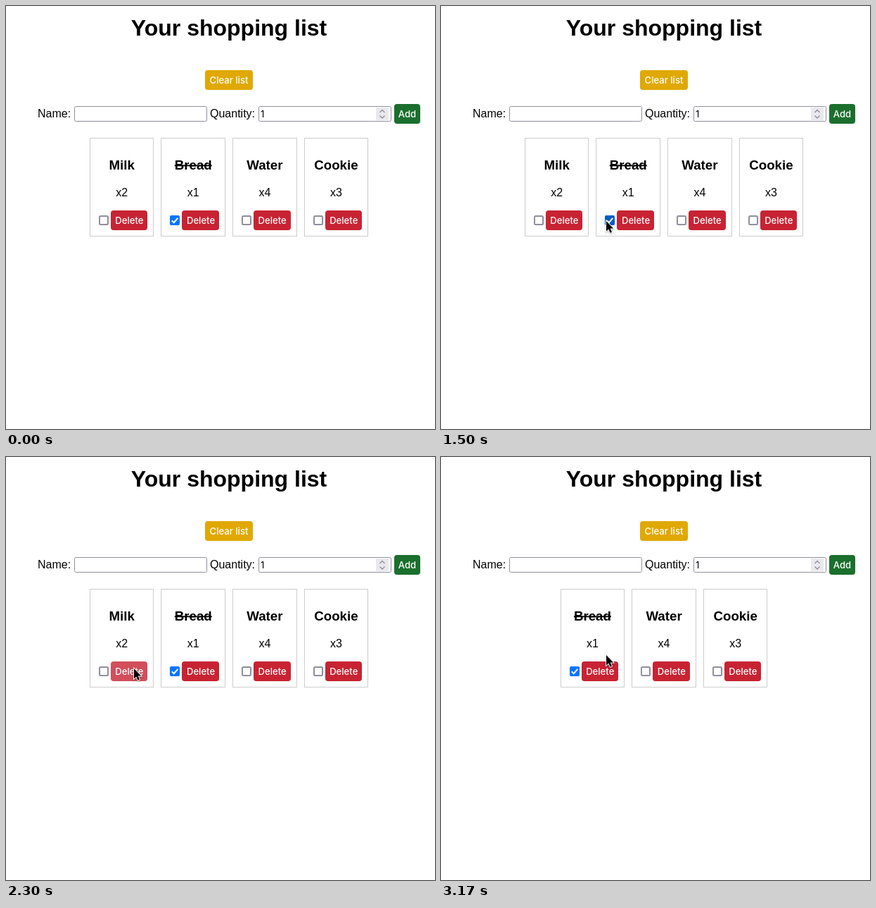
Recreate the animation shown at these times as an HTML page. Size 610 by 600 pixels, loop 3340 ms.

```html
<!DOCTYPE html>
<html lang="en">
<head>
<meta charset="utf-8">
<title>Shopping list</title>
<style>
  html, body { margin: 0; width: 100%; height: 100%; overflow: hidden; background: #fff; }
  svg { display: block; font: 16px "Liberation Sans", Arial, sans-serif; }
  .mid { text-anchor: middle; }
  .ui { font: 500 13.1px Inter, sans-serif; fill: #fff; text-anchor: middle; }
  .name { font-weight: bold; font-size: 18.72px; text-anchor: middle; }
  .field { fill: #fff; stroke: #8f8f9d; }
</style>
</head>
<body>
<svg width="610" height="600" viewBox="0 0 610 600">
  <text class="mid" x="317" y="42" font-size="32" font-weight="bold">Your shopping list</text>
  <rect x="283" y="91" width="68" height="28" rx="4" fill="#e0a800"/>
  <text class="ui" x="317" y="110">Clear list</text>
  <text x="45" y="158">Name:</text>
  <rect class="field" x="97.5" y="142.5" width="188" height="21" rx="2"/>
  <text x="290" y="158">Quantity:</text>
  <rect class="field" x="359.5" y="142.5" width="188" height="21" rx="2"/>
  <text x="362" y="158" style="font: 13.1px Inter, sans-serif">1</text>
  <rect x="526" y="144" width="18" height="18" fill="#e9e9ed"/>
  <path d="M531.5 151l3.5-3.5 3.5 3.5M531.5 155.500l3.5 3.5 3.5-3.5" fill="none" stroke="#8f8f9d" stroke-width="1.4"/>
  <rect x="552" y="139" width="37" height="28" rx="4" fill="#1b6f2d"/>
  <text class="ui" x="570.5" y="158">Add</text>
  <g id="cards"></g>
  <path id="cursor" d="M0 0V14.500L3.300 11.500 5.600 16.800 8 15.800 5.700 10.500H10.200Z" stroke="#fff" stroke-width="1.8"
    paint-order="stroke" style="filter: drop-shadow(0 1px 1px #0005)"/>
</svg>
<script>
const LOOP = 3340, DELETED = 2400, PITCH = 101.6, WIDTH = 91.6;
const items = [["Milk", 2], ["Bread", 1, true], ["Water", 4], ["Cookie", 3]];
// Pointer path: time, x, y
const path = [
  [300, 484, 489], [400, 462, 393], [500, 427, 352], [600, 402, 334], [900, 384, 314],
  [1200, 382, 311], [1300, 365, 309], [1400, 300, 306], [1500, 235, 305], [1600, 205, 305],
  [1700, 196, 305], [1900, 186, 302], [2100, 182, 300], [2700, 182, 300],
  [2900, 196, 290], [3000, 224, 282], [3170, 235, 281]
];
const cards = document.getElementById("cards");
const cursor = document.getElementById("cursor");

// The pointer is sampled in steps
function step(t) {
  if (t >= 3170) return 3170;
  const s = Math.min(3000, Math.floor(t / 100) * 100);
  return s === 2800 ? 2700 : s;
}

function pointer(t) {
  if (t < path[0][0]) return null;
  const i = path.findIndex(p => p[0] >= t);
  const b = path[i], a = path[Math.max(0, i - 1)];
  const k = b === a || b[0] === t ? 1 : (t - a[0]) / (b[0] - a[0]);
  return [1, 2].map(n => Math.round(a[n] + (b[n] - a[n]) * k));
}

function card([name, count, done], x, mouse) {
  const left = Math.floor(x), right = Math.floor(x + WIDTH);
  const boxX = left + 13, btnX = Math.floor(x + 30), btnEnd = Math.floor(x + 82.6);
  const over = (x0, x1, y0, y1) =>
    mouse && mouse[0] >= x0 && mouse[0] <= x1 && mouse[1] >= y0 && mouse[1] <= y1;
  const mid = x + WIDTH / 2 - 0.4;
  const blue = over(boxX - 1, boxX + 14, 297, 311) ? "#005cc8" : "#0075ff";
  const box = done
    ? `<rect x="${boxX}" y="297" width="14" height="14" rx="2" fill="${blue}"/>
       <path d="M${boxX + 2.8} 304.300l2.900 2.900 5.600-6.400" fill="none" stroke="#fff" stroke-width="2"/>`
    : `<rect x="${boxX + 1}" y="298" width="12" height="12" rx="1.500" fill="#fff" stroke="#8f8f9d" stroke-width="2"/>`;
  return `<rect x="${left + 0.5}" y="187.500" width="${right - left - 1}" height="138.900" fill="none" stroke="#ccc"/>
    <text class="name" x="${mid}" y="232" ${done ? 'text-decoration="line-through"' : ""}>${name}</text>
    <text class="mid" x="${mid}" y="270">x${count}</text>${box}
    <g opacity="${over(btnX, btnEnd, 290, 318) ? 0.8 : 1}">
      <rect x="${btnX}" y="290" width="${btnEnd - btnX}" height="28" rx="4" fill="#c82333"/>
      <text class="ui" x="${x + 56.2}" y="309">Delete</text>
    </g>`;
}

let last = -1;
function draw(now) {
  const t = step(now % LOOP);
  if (t !== last) {
    last = t;
    const mouse = pointer(t);
    const list = t < DELETED ? items : items.slice(1);
    const start = 322.45 - list.length * PITCH / 2;
    cards.innerHTML = list.map((item, i) => card(item, start + i * PITCH, mouse)).join("");
    cursor.setAttribute("visibility", mouse ? "visible" : "hidden");
    if (mouse) cursor.setAttribute("transform", `translate(${mouse})`);
  }
}

const begin = performance.now();
function tick() {
  draw(performance.now() - begin);
  requestAnimationFrame(tick);
}
tick();
</script>
</body>
</html>
```
